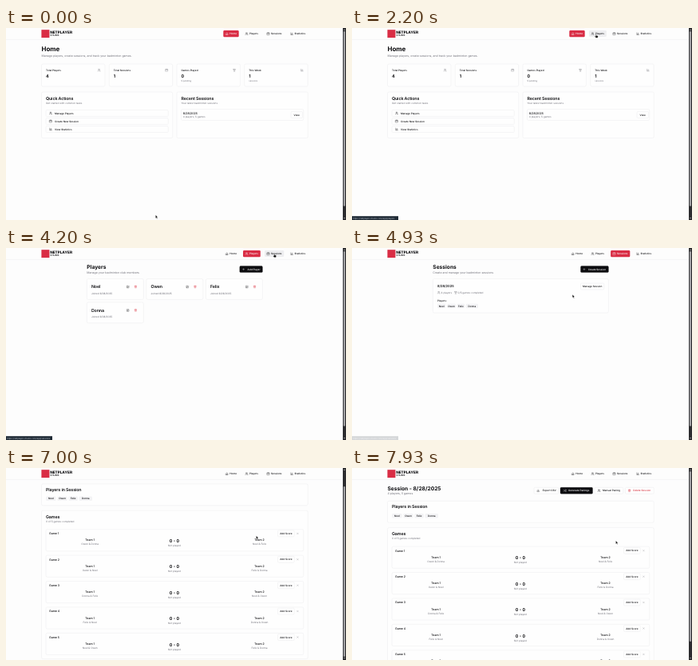
These frames come from a looping animation (426 by 240 pixels, 8 s). An HTML page:

```html
<!DOCTYPE html>
<html lang="en">
<head>
<meta charset="utf-8">
<title>Club manager tour</title>
<style>
  html, body { margin: 0; width: 100%; height: 100%; overflow: hidden; background: #fdfdfd; }
  svg { display: block; width: 100vw; height: 100vh; }
  text { font-family: Inter, sans-serif; text-rendering: geometricPrecision; white-space: pre; }
</style>
</head>
<body>
<svg id="stage" viewBox="0 0 426 240"></svg>
<script>
const LOOP = 8000;
const UNIT = 426 / 1920; // one layout pixel on the stage
const INK = '#0c0c0f', GRAY = '#71717a', RED = '#d92d45', LINE = '#dedee2', SOFT = '#f3f3f5', BG = '#fdfdfd';
const LEFT = 44.5, RIGHT = 378.2, MID_LEFT = 101.3, MID_RIGHT = 321.4;
const MAX_SCROLL = 21.4;
const DATE = '8/28/2025';
const [A, B, C, D] = ['Noel', 'Owen', 'Felix', 'Donna'];

// Lucide-like outlines on a 24 unit grid
const ICONS = {
  home: 'M3 10l9-7 9 7v11H3zM9 21v-9h6v9',
  users: 'M2 21v-2a4 4 0 0 1 4-4h6a4 4 0 0 1 4 4v2M9 3a4 4 0 1 0 .1 0M22 21v-2a4 4 0 0 0-3-4M16 3a4 4 0 0 1 0 8',
  calendar: 'M3 4h18v18H3zM3 10h18M8 2v4M16 2v4',
  chart: 'M3 3v18h18M8 17v-3M13 17V5M18 17V9',
  trophy: 'M6 3h12v6a6 6 0 0 1-12 0zM6 5H2c0 4 2 5 4 5M18 5h4c0 4-2 5-4 5M12 15v6M7 22h10',
  plus: 'M5 12h14M12 5v14',
  pen: 'M12 3H3v18h18v-9M8 16l1-5 9-9 4 4-9 9z',
  trash: 'M3 6h18M5 6v15h14V6M8 6V2h8v4M10 11v6M14 11v6',
  download: 'M3 15v6h18v-6M7 10l5 5 5-5M12 15V3',
  shuffle: 'M2 18h4l9-12h7M18 2l4 4-4 4M2 6h4l3 4M12 15l3 3h7M18 14l4 4-4 4',
  close: 'M6 6l12 12M18 6L6 18'
};

// cy is the middle of the capitals
function text(x, cy, label, size = 14, { weight = 400, fill = INK, anchor = 'start', spacing = 0 } = {}) {
  const px = size * UNIT;
  return `<text x="${x}" y="${cy + px * 0.36}" font-size="${px}" font-weight="${weight}" fill="${fill}"
    text-anchor="${anchor}" letter-spacing="${spacing * px}">${label.replace('&', '&amp;')}</text>`;
}
const muted = (x, cy, label, size = 14, anchor = 'start') => text(x, cy, label, size, { fill: GRAY, anchor });
const title = (x, cy, label) => text(x, cy, label, 24, { weight: 600, spacing: -0.022 });
const heading = (x, cy, label, size = 30) => text(x, cy, label, size, { weight: 700 });

function icon(name, cx, cy, color = INK, size = 16) {
  const s = size * UNIT / 24;
  return `<path d="${ICONS[name]}" transform="translate(${cx - 12 * s} ${cy - 12 * s}) scale(${s})"
    fill="none" stroke="${color}" stroke-width="2" stroke-linecap="round" stroke-linejoin="round"/>`;
}

function box(x1, y1, x2, y2, { fill = '#fefefe', stroke = LINE, r = 1.8 } = {}) {
  return `<rect x="${x1}" y="${y1}" width="${x2 - x1}" height="${y2 - y1}" rx="${r}"
    fill="${fill}" stroke="${stroke}" stroke-width=".28"/>`;
}

function button(x1, x2, cy, label, { textX, iconX, iconName, fill = '#fefefe', color = INK } = {}) {
  return box(x1, cy - 4, x2, cy + 4, { fill, stroke: fill === INK ? INK : LINE, r: 1.3 })
    + (iconName ? icon(iconName, iconX, cy, color) : '')
    + (textX ? text(textX, cy, label, 14, { weight: 500, fill: color })
             : text((x1 + x2) / 2, cy, label, 14, { weight: 500, fill: color, anchor: 'middle' }));
}

function chips(cy, spans) {
  return [A, B, C, D].map((name, i) => {
    const [x1, x2] = spans[i];
    return box(x1, cy - 2.8, x2, cy + 2.8, { fill: SOFT, stroke: 'none', r: 1.3 })
      + text((x1 + x2) / 2, cy, name, 14, { weight: 500, anchor: 'middle' });
  }).join('');
}

const NAV = [
  { label: 'Home', icon: 'home', x1: 272.3, x2: 291.7 },
  { label: 'Players', icon: 'users', x1: 297, x2: 318.8 },
  { label: 'Sessions', icon: 'calendar', x1: 324.1, x2: 348.3 },
  { label: 'Statistics', icon: 'chart', x1: 353.6, x2: RIGHT }
];

function header(active) {
  return `<rect width="422" height="14.4" fill="${BG}"/><rect y="14.3" width="422" height=".25" fill="${LINE}"/>
    <rect x="44.4" y="2.2" width="10" height="10" fill="${RED}"/>`
    + text(55.2, 5.5, 'NETPLAYER', 21, { weight: 800 })
    + text(55.2, 9.4, 'CHUMS', 13.5, { weight: 500 })
    + NAV.map((item, i) => {
      const color = i === active ? '#fff' : INK;
      return (i === active ? box(item.x1, 3.1, item.x2, 11.2, { fill: RED, stroke: 'none', r: 1.3 }) : '')
        + icon(item.icon, item.x1 + 4.5, 7.2, color)
        + text(item.x1 + 8, 7.2, item.label, 14, { weight: 500, fill: color });
    }).join('');
}

function homePage() {
  const stats = [
    ['Total Players', '4', '', 'users'], ['Total Sessions', '1', '', 'calendar'],
    ['Games Played', '0', '5 pending', 'trophy'], ['This Week', '1', 'sessions', 'chart']
  ];
  const actions = [['Manage Players', 'users'], ['Create New Session', 'calendar'], ['View Statistics', 'chart']];
  return heading(LEFT, 26.5, 'Home', 36)
    + muted(LEFT, 35, 'Manage players, create sessions, and track your badminton games.', 16)
    + stats.map(([label, value, note, name], i) => {
      const x = LEFT + i * 84.75;
      return box(x, 45, x + 79.4, 73) + text(x + 5.5, 52.5, label, 14, { weight: 500 })
        + icon(name, x + 72.1, 52.7, GRAY) + text(x + 5.5, 60, value, 24, { weight: 700 })
        + muted(x + 5.5, 65.7, note, 12);
    }).join('')
    + box(LEFT, 80, 208.7, 137.6) + title(50, 88, 'Quick Actions') + muted(50, 94, 'Get started with common tasks')
    + actions.map(([label, name], i) =>
      button(50, 203.3, 106.5 + i * 10, label, { textX: 61, iconX: 56, iconName: name })).join('')
    + box(214, 80, RIGHT, 137.6) + title(219.5, 88, 'Recent Sessions') + muted(219.5, 94, 'Your latest badminton sessions')
    + box(219.5, 101.5, 372.8, 115.5) + text(221.8, 106.3, DATE, 16, { weight: 500 })
    + muted(221.8, 111.3, '4 players, 5 games') + button(357, 371.5, 108.5, 'View');
}

function playersPage() {
  return heading(MID_LEFT, 24, 'Players') + muted(MID_LEFT, 30.3, 'Manage your badminton club members', 16)
    + button(292.8, MID_RIGHT, 26.6, 'Add Player', { textX: 302.6, iconX: 297.6, iconName: 'plus', fill: INK, color: '#fff' })
    + [A, B, C, D].map((name, i) => {
      const x = MID_LEFT + i % 3 * 74.55, y = 38.5 + Math.floor(i / 3) * 29.4;
      return box(x, y, x + 71, y + 25.9) + title(x + 5.6, y + 9.8, name)
        + icon('pen', x + 51.4, y + 10) + icon('trash', x + 61.1, y + 10, '#dc3b4a')
        + muted(x + 5.6, y + 18.2, 'Joined ' + DATE);
    }).join('');
}

function sessionsPage() {
  return heading(MID_LEFT, 24, 'Sessions') + muted(MID_LEFT, 30.3, 'Create and manage your badminton sessions', 16)
    + button(286.5, MID_RIGHT, 26.6, 'Create Session', { textX: 295.7, iconX: 290.9, iconName: 'plus', fill: INK, color: '#fff' })
    + box(MID_LEFT, 38.5, MID_RIGHT, 81) + text(107, 48, DATE, 18, { weight: 600 })
    + button(286.5, 315.8, 48, 'Manage Session')
    + icon('users', 108.7, 55.7, GRAY) + muted(111.6, 55.7, '4 players')
    + icon('trophy', 129.9, 55.7, GRAY) + muted(132.6, 55.7, '0/5 games completed')
    + text(107, 65.4, 'Players:', 14, { weight: 500 })
    + chips(72.5, [[107, 117.4], [119.2, 129.9], [131.6, 141.2], [142.8, 158]]);
}

function detailPage() {
  const games = [[B, D, A, C], [B, A, C, D], [D, C, A, B], [C, A, D, B], [A, B, C, D]];
  return heading(LEFT, 26, 'Session - ' + DATE) + muted(LEFT, 32.2, '4 players, 5 games', 16)
    + button(228, 258.5, 28.3, 'Export CSV', { textX: 238.8, iconX: 233.2, iconName: 'download' })
    + button(261, 301.5, 28.3, 'Generate Pairings', { textX: 271, iconX: 266.8, iconName: 'shuffle', fill: INK, color: '#fff' })
    + button(304, 339.8, 28.3, 'Manual Pairing', { textX: 314, iconX: 309.5, iconName: 'users' })
    + button(342.4, RIGHT, 28.3, 'Delete Session', { textX: 352.2, iconX: 347.6, iconName: 'trash', color: '#d8323f' })
    + box(LEFT, 41.3, RIGHT, 68.2) + title(50, 48.5, 'Players in Session')
    + chips(59.7, [[50.2, 62.6], [64.4, 76.6], [78.6, 89.8], [91.6, 108]])
    + box(LEFT, 74.6, RIGHT, 260) + title(50, 82, 'Games') + muted(50, 88, '0 of 5 games completed')
    + games.map(([a, b, c, d], i) => {
      const y = 103.3 + i * 32.4;
      const team = (x, label, pair) => text(x, y + 8.3, label, 16, { weight: 500, anchor: 'middle' })
        + muted(x, y + 13.3, pair, 14, 'middle');
      return box(50, y - 5.2, 372.8, y + 22) + text(54, y, 'Game ' + (i + 1), 16, { weight: 500 })
        + team(105.2, 'Team 1', `${a} & ${b}`) + team(317.5, 'Team 2', `${c} & ${d}`)
        + text(210.9, y + 9.2, '0 - 0', 24, { weight: 700, anchor: 'middle' })
        + muted(210.9, y + 15, 'Not played', 14, 'middle')
        + button(340.5, 361.2, y, 'Add Score') + icon('close', 365.4, y, GRAY, 14);
    }).join('');
}

const PAGES = [homePage, playersPage, sessionsPage, detailPage];
const PAGE_STARTS = [0, 2550, 4300, 6250];
const MANAGE = { x1: 286.5, x2: 315.8, y1: 44, y2: 52 };

const STATUS = [
  { from: 2130, to: 3050, width: 58, url: 'https://netplayer-chums.com/app/players' },
  { from: 3900, to: 4790, width: 58, url: 'https://netplayer-chums.com/app/sessions' },
  { from: 5600, to: 6480, width: 79, url: 'https://netplayer-chums.com/app/sessions/1756378234619' }
];

// [time, x, y] of the pointer tip
const POINTER = [
  [70, 187.4, 233.8], [870, 288.5, 11], [1030, 306, 8], [1270, 306, 8], [1650, 307, 7.6], [2070, 305.8, 7.6],
  [2930, 306, 7.6], [3290, 198.2, 50.8], [3400, 198.2, 50.8], [3800, 336, 7], [4690, 336.5, 7],
  [4930, 276.2, 58.2], [5080, 276.2, 58.2], [5530, 304.4, 48], [6420, 304.4, 48],
  [6900, 313.5, 84.8], [7350, 313.5, 84.8], [7900, 330.5, 91]
];
const SCROLL = [[6560, 0], [6960, MAX_SCROLL], [7330, MAX_SCROLL], [7830, 0]];

const stage = document.getElementById('stage');
stage.innerHTML = PAGES.map((page, i) =>
  `<g id="page${i}"><g id="body${i}">${page()}</g>${header(i < 3 ? i : -1)}</g>`).join('')
  + `<rect id="hover" height="8" rx="1.3" fill="#f0f0f2" style="mix-blend-mode:multiply"/>
    <rect x="422" width="4" height="240" fill="#2c2c2e"/>
    <rect id="thumb" x="422.8" width="2.2" rx="1" fill="#9f9fa1"/>
    <path d="M424 1.4l1.1 1.7h-2.2zM424 238.6l1.1-1.7h-2.2z" fill="#9f9fa1"/>`
  + STATUS.map((s, i) => `<g id="status${i}"><rect y="235.2" width="${s.width}" height="4.8" fill="#1f2a35"/>`
    + text(1.2, 237.6, s.url, 12, { fill: '#c3ccd6' }) + '</g>').join('')
  + `<g id="pointer" stroke="#fff" stroke-width=".3" stroke-linejoin="round" fill="#050505">
      <path id="arrow" d="M0 0v3.9l.9-.8.7 1.5.7-.3-.7-1.5h1.2z"/>
      <path id="hand" d="M-.4.3q.4-.6.8 0v1.5l1.7.4q.4.2.3.7l-.4 1.8h-2.2l-1.4-1.8q.1-.6.6-.4l.6.4z"/>
    </g>`;
const get = id => document.getElementById(id);
const show = (id, on) => get(id).setAttribute('visibility', on ? 'visible' : 'hidden');
const clamp = v => Math.min(1, Math.max(0, v));

function track(keys, t) {
  const next = keys.findIndex(k => k[0] > t);
  if (next === 0) return keys[0].slice(1);
  if (next < 0) return keys[keys.length - 1].slice(1);
  const from = keys[next - 1], to = keys[next];
  const u = (t - from[0]) / (to[0] - from[0]), eased = u * u * (3 - 2 * u);
  return from.slice(1).map((v, i) => v + (to[i + 1] - v) * eased);
}

function draw(t) {
  const current = PAGE_STARTS.filter(start => t >= start).length - 1;
  PAGES.forEach((_, i) => show('page' + i, i === current));

  const [scroll] = track(SCROLL, t);
  get('body3').setAttribute('transform', `translate(0 ${-scroll})`);
  const overflow = current === 3 ? MAX_SCROLL : 14.4;
  const ratio = 232 / (240 + overflow);
  get('thumb').setAttribute('y', 4 + scroll * ratio);
  get('thumb').setAttribute('height', 240 * ratio);

  const [x, y] = track(POINTER, t);
  const zones = NAV.map(item => ({ ...item, y1: 3.1, y2: 11.2 }));
  if (current === 2) zones.push(MANAGE);
  const hit = zones.findIndex(z => x > z.x1 && x < z.x2 && y > z.y1 && y < z.y2);
  const tinted = hit >= 0 && (hit !== current || current === 3);
  show('hover', tinted);
  if (tinted) {
    const zone = zones[hit];
    get('hover').setAttribute('x', zone.x1);
    get('hover').setAttribute('y', zone.y1);
    get('hover').setAttribute('width', zone.x2 - zone.x1);
  }
  show('arrow', hit < 0);
  show('hand', hit >= 0);
  get('pointer').setAttribute('transform', `translate(${x} ${y})`);

  STATUS.forEach((s, i) => get('status' + i).setAttribute('opacity',
    Math.min(clamp((t - s.from) / 70), clamp(1 - (t - s.to) / 170))));
}

const start = performance.now();
function tick() {
  draw((performance.now() - start) % LOOP);
  requestAnimationFrame(tick);
}
tick();
</script>
</body>
</html>
```
